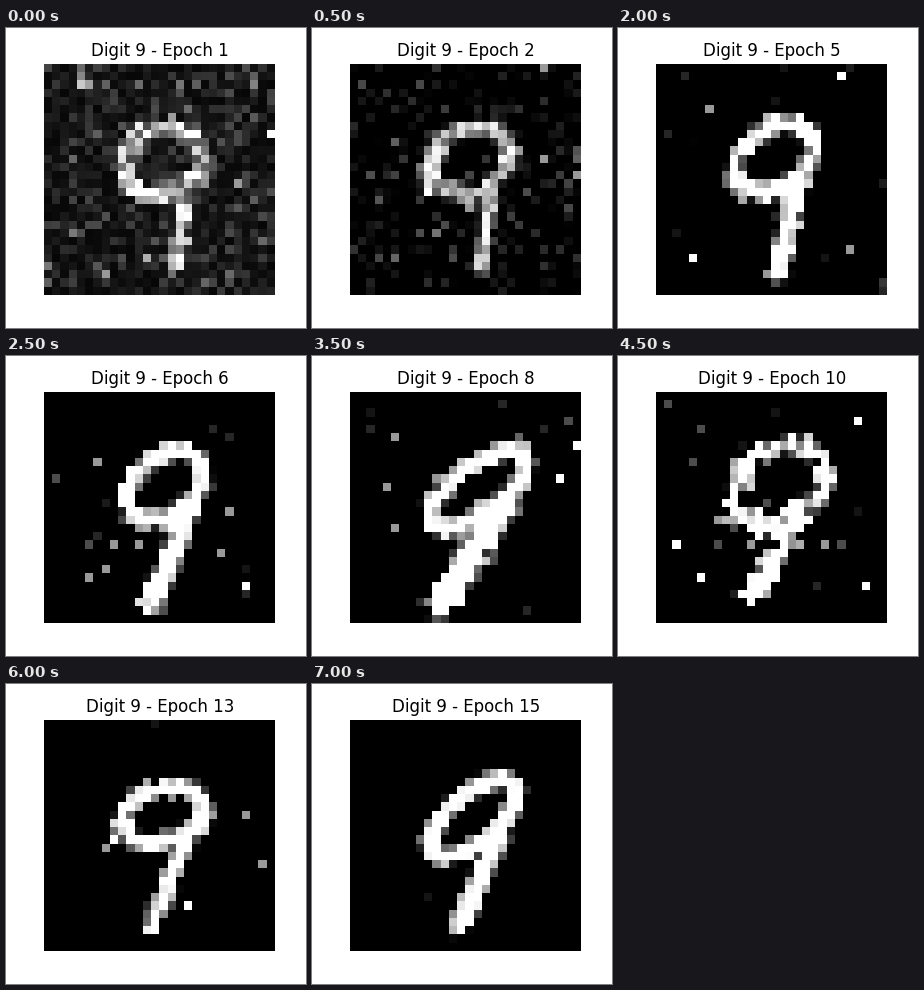
These frames come from a looping animation (300x300 px, 7500 ms). A matplotlib script:

```python
import numpy as np
import matplotlib.pyplot as plt
from matplotlib.animation import FuncAnimation

N = 28
EPOCHS = 15
ROWS, COLS = np.mgrid[0:N, 0:N].astype(float)

# Key poses: epoch, loop centre, radii, tilt in degrees, foot of the stem,
# half width of the stem, grain, number of stray pixels.
POSES = np.array([
    (1, 14.0, 11.3, 4.8, 3.9, 10, 15.2, 24.0, 1.3, .40, 12),
    (4, 13.7, 11.0, 5.3, 3.6, 35, 16.0, 24.5, 1.2, .45, 22),
    (6, 14.2, 10.9, 5.2, 3.4, 35, 12.6, 25.0, 1.7, .32, 15),
    (8, 15.0, 11.3, 7.0, 2.9, 36, 10.6, 25.0, 2.1, .40, 13),
    (10, 14.5, 10.8, 6.0, 4.3, 30, 11.2, 24.0, 1.6, .75, 22),
    (13, 14.0, 11.0, 5.0, 3.2, 15, 12.6, 24.5, 1.3, .28, 6),
    (15, 14.5, 11.4, 6.3, 2.9, 40, 12.8, 24.5, 1.5, .20, 1),
])


def pose(epoch):
    return [np.interp(epoch, POSES[:, 0], col) for col in POSES[:, 1:].T]


def distance(x, y):
    """Distance from every cell to a curve given by dense points."""
    return np.hypot(COLS[..., None] - x, ROWS[..., None] - y).min(axis=-1)


def sample(epoch):
    rng = np.random.default_rng(epoch)
    cx, cy, long, short, tilt, fx, fy, stem, grain, strays = pose(epoch)

    a = np.linspace(0, 2 * np.pi, 120)
    u, v, tilt = long * np.cos(a), short * np.sin(a), np.radians(tilt)
    ring = distance(cx + u * np.cos(tilt) + v * np.sin(tilt),
                    cy - u * np.sin(tilt) + v * np.cos(tilt))
    t = np.linspace(0, 1, 60)
    sx, sy = cx + 3.1, cy + 2.2
    line = distance(sx + (fx - sx) * t, sy + (fy - sy) * t)

    # Grain frays the edges and knocks holes into the strokes.
    ink = np.maximum(1.35 - ring, stem - line)
    rough = 1.5 * ink + grain * rng.normal(size=(N, N))
    img = np.where(ink > -.6, np.clip(rough, 0, 1), 0)

    # Early epochs are dimmer and covered by a haze that thins out.
    img *= rng.uniform(min(1, .25 * epoch), 1, (N, N))
    haze = rng.exponential(1, (N, N)) - 1.5 * (epoch - 1) + .25
    img += .1 * np.maximum(haze, 0)

    for _ in range(round(strays)):
        r, c = rng.integers(0, N, 2)
        img[r, c] = max(img[r, c], rng.choice([.08, .15, .3, .6, 1]))
    return np.clip(img, 0, 1)


images = [sample(e) for e in range(1, EPOCHS + 1)]

fig, ax = plt.subplots(figsize=(3, 3), dpi=100)
ax.axis("off")
view = ax.imshow(images[0], cmap="gray", vmin=0, vmax=1, interpolation="nearest")
title = ax.set_title("Digit 9 - Epoch 1")


def update(i):
    view.set_data(images[i])
    title.set_text(f"Digit 9 - Epoch {i + 1}")
    return view, title


anim = FuncAnimation(fig, update, frames=EPOCHS, interval=500, repeat=True)
plt.show()
```
